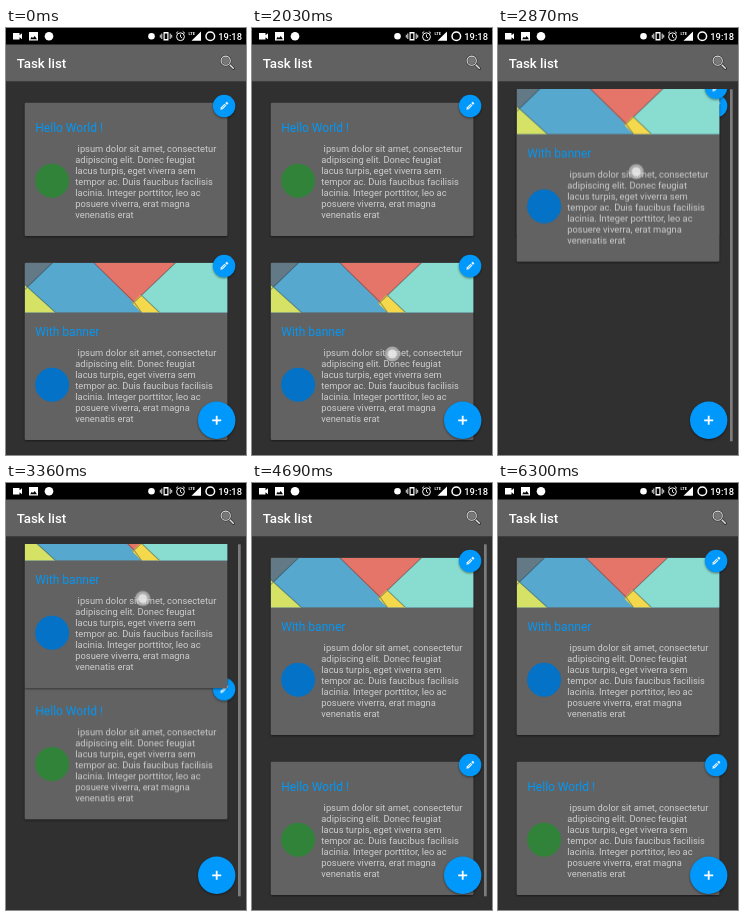
Recreate the animation shown at these times as an HTML page. Size 240 px wide and 427 px high, loop 6370 ms.

```html
<!DOCTYPE html>
<html lang="en">
<head>
<meta charset="utf-8">
<title>Task list</title>
<style>
  html, body { margin: 0; width: 100%; height: 100%; overflow: hidden; background: #303030; }
  svg { display: block; width: 100%; height: 100%; }
  text { font-family: Roboto, Arial, sans-serif; }
  .bar-title { font-size: 13.33px; font-weight: 500; fill: #fff; }
  .clock { font-size: 9.33px; font-weight: 500; fill: #fff; }
  .card-title { font-size: 12px; fill: #0098f8; }
  .body { font-size: 9.33px; fill: #cdcdcd; white-space: pre; }
  .panel { fill: #626262; filter: drop-shadow(0 1px 1px rgba(0, 0, 0, .45)); }
  .fab { fill: #0098fb; filter: drop-shadow(0 1px 1.2px rgba(0, 0, 0, .45)); }

  .dragged, .pushed, .touch, .scrollbar { animation: 6370ms linear infinite; }
  .dragged { animation-name: drag; }
  .pushed { animation-name: push; }
  .touch { animation-name: finger, press; }
  .scrollbar { animation-name: scrollbar; }

  @keyframes drag {
    0%, 32.97% { transform: translateY(0); }
    38.46% { transform: translateY(-88px); }
    43.96% { transform: translateY(-173px); }
    50.55% { transform: translateY(-205px); }
    52.75% { transform: translateY(-207px); }
    57.14% { transform: translateY(-224px); }
    64.84% { transform: translateY(-232px); }
    68.76% { transform: translateY(-232px); animation-timing-function: ease-in-out; }
    72.84%, 100% { transform: translateY(-160px); }
  }
  @keyframes push {
    0% { transform: translateY(0); }
    50.5% { transform: translateY(0); animation-timing-function: ease-in-out; }
    54.43%, 100% { transform: translateY(204px); }
  }
  @keyframes finger {
    0%, 32.97% { transform: translate(140.3px, 326px); }
    38.46% { transform: translate(140px, 234px); }
    43.96% { transform: translate(138.5px, 149px); }
    50.55% { transform: translate(137px, 117px); }
    52.75% { transform: translate(136.7px, 115.5px); }
    57.14% { transform: translate(135px, 98px); }
    64.84%, 100% { transform: translate(133.7px, 93px); }
  }
  @keyframes press {
    0%, 25.1% { opacity: 0; }
    25.11%, 68.3% { opacity: 1; }
    68.31%, 100% { opacity: 0; }
  }
  @keyframes scrollbar {
    0%, 42.8% { opacity: 0; }
    42.81%, 89.5% { opacity: 1; }
    95.6%, 100% { opacity: 0; }
  }
</style>
</head>
<body>
<svg viewBox="0 0 240 427" preserveAspectRatio="none">
  <defs>
    <clipPath id="list"><rect y="61.3" width="240" height="352"/></clipPath>
    <clipPath id="banner-box"><path d="M0 50V1.3Q0 0 1.3 0H201.4Q202.7 0 202.7 1.3V50Z"/></clipPath>
    <g id="lorem" class="body">
      <text x="50.6" y="49.4" xml:space="preserve"> ipsum dolor sit amet, consectetur</text>
      <text x="50.6" y="60.3">adipiscing elit. Donec feugiat</text>
      <text x="50.6" y="71.3">lacus turpis, eget viverra sem</text>
      <text x="50.6" y="82.2">tempor ac. Duis faucibus facilisis</text>
      <text x="50.6" y="93.2">lacinia. Integer porttitor, leo ac</text>
      <text x="50.6" y="104.1">posuere viverra, erat magna</text>
      <text x="50.6" y="115">venenatis erat</text>
    </g>
    <g id="edit">
      <circle class="fab" r="11.2"/>
      <g transform="rotate(-45)" fill="#e4f4ff">
        <path d="M-5.4 0L-3.2 -1.3H2V1.3H-3.2Z"/>
        <rect x="2.8" y="-1.3" width="2.2" height="2.6" rx=".6"/>
      </g>
      <path d="M-1.9 1.9L1.2 -1.2" stroke="#0098fb" stroke-width=".6"/>
    </g>
  </defs>

  <rect width="240" height="427" fill="#303030"/>

  <g clip-path="url(#list)">
    <g class="pushed">
      <g transform="translate(18.7 74.7)">
        <rect class="panel" width="202.7" height="133.3" rx="1.3"/>
        <text class="card-title" x="10.6" y="29.6">Hello World !</text>
        <circle cx="27.4" cy="78" r="17" fill="#31833a"/>
        <use href="#lorem"/>
        <use href="#edit" x="199.4" y="3.3"/>
      </g>
    </g>

    <g class="dragged">
      <g transform="translate(18.7 234.7)">
        <rect class="panel" width="202.7" height="177.3" rx="1.3"/>
        <g clip-path="url(#banner-box)">
          <rect width="203" height="50" fill="#56a8cf"/>
          <path d="M0 0H28L0 27Z" fill="#637a86"/>
          <path d="M0 22L31 50H0Z" fill="#d6e265"/>
          <path d="M150 0H203V50H134L115 33Z" fill="#88dcd0"/>
          <path d="M69 0H151L109 40Z" fill="#e57569"/>
          <path d="M116 32L135 50H117L107.500 40.500Z" fill="#f5d94c"/>
          <g fill="none" stroke="#1e3640" stroke-opacity=".4" stroke-width="1.1">
            <path d="M28 0L0 27M0 22L31 50M69 0L109 39L117 50M151 0L108 41M116 32L135 50"/>
          </g>
        </g>
        <text class="card-title" x="10.6" y="73.6">With banner</text>
        <circle cx="27.4" cy="122" r="17" fill="#0472c6"/>
        <use href="#lorem" y="44"/>
        <use href="#edit" x="199.4" y="3.3"/>
      </g>
    </g>
    <rect class="scrollbar" x="232" y="61.3" width="2.7" height="352" fill="#7c7c7c"/>
  </g>

  <circle class="fab" cx="210.7" cy="392.3" r="18.7"/>
  <path d="M206.2 392.300H215.200M210.700 387.800V396.800" stroke="#fff" stroke-width="1.8"/>

  <!-- App bar -->
  <rect y="16" width="240" height="37.3" fill="#616161"/>
  <text class="bar-title" x="10.7" y="39.5">Task list</text>
  <g fill="none" stroke-linecap="round">
    <path d="M223.500 36.500L227.500 40.500" stroke="#333" stroke-width="3"/>
    <path d="M223.500 36.500L227.300 40.300" stroke="#ddd" stroke-width="1.5"/>
    <circle cx="219.7" cy="32.700" r="4.700" fill="#777" stroke="#333" stroke-width="2.2"/>
    <circle cx="219.7" cy="32.700" r="4.600" stroke="#ddd" stroke-width="1.1"/>
  </g>

  <!-- Status bar -->
  <rect width="240" height="16.500" fill="#000"/>
  <g fill="#fff">
    <path d="M7 5H13.500V7.200L16 5.200V11.300L13.500 9.300V11.500H7Z"/>
    <path fill-rule="evenodd" d="M23 4H32V12.500H23ZM24.200 11.200H31L28.700 8L27 10.100L25.800 8.800Z"/>
    <circle cx="43" cy="8.300" r="4.300"/>
    <circle cx="145.500" cy="8.200" r="3.300"/>
    <path d="M157.500 4H162.500V12.500H157.500Z"/>
    <path d="M155.800 5.500V11M164.200 5.500V11M154.300 6.800V9.700M165.700 6.800V9.700" stroke="#fff" stroke-width=".9"/>
    <path d="M158.700 5.500H161.300V11H158.700Z" fill="#000"/>
    <path d="M195 3.500V12.800H185.500Z"/>
    <text x="182.500" y="7" font-size="4" font-weight="700">LTE</text>
  </g>
  <g fill="none" stroke="#fff">
    <circle cx="174.500" cy="8.700" r="3.900"/>
    <path d="M174.500 6.500V8.900L176.200 10M170 5.300L172.200 3.500M179 5.300L176.800 3.500" stroke-width=".9"/>
    <circle cx="204.300" cy="8.200" r="4.300" stroke-width="1.500"/>
  </g>
  <text class="clock" x="212.300" y="11.700">19:18</text>

  <g class="touch">
    <circle r="7.600" fill="#cfcfcf" fill-opacity=".65"/>
    <circle r="4.500" fill="#f2f2f2" fill-opacity=".75"/>
  </g>
</svg>
</body>
</html>
```
